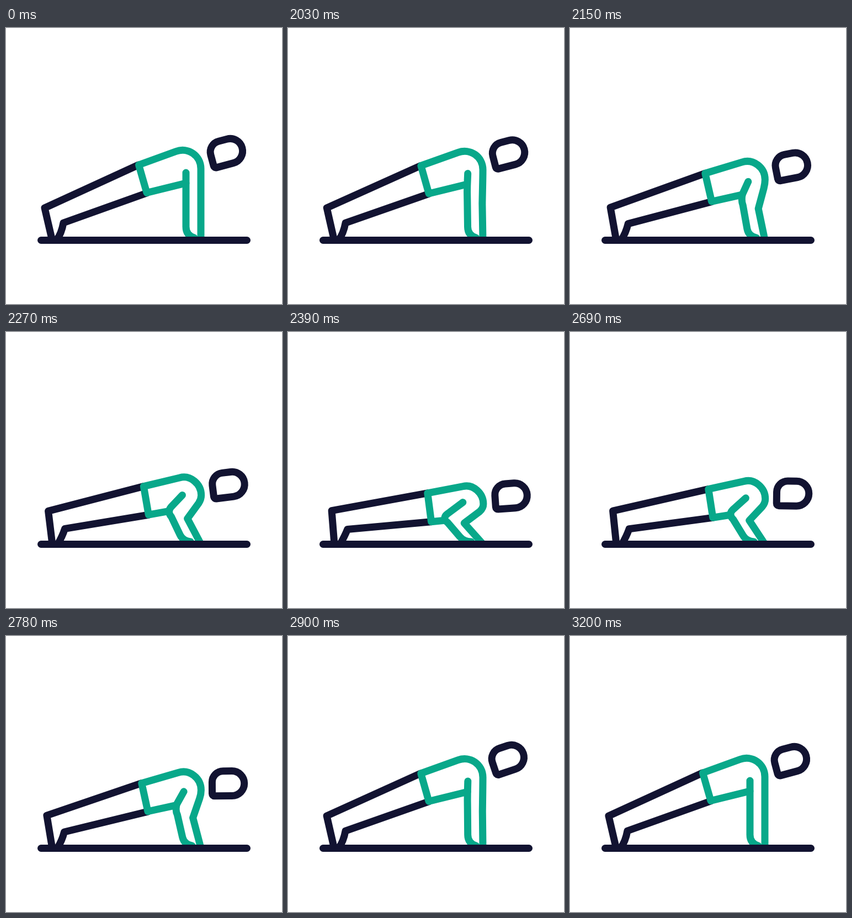
Write an HTML page that moves like this. It is 500 px wide and 500 px high and loops after 3.26 s.

```html
<!DOCTYPE html>
<html lang="en">
<head>
<meta charset="utf-8">
<title>Push-up</title>
<style>
  html, body { margin: 0; width: 100%; height: 100%; overflow: hidden; background: #fff; }
  svg { display: block; width: 100%; height: 100%; fill: none; stroke: #121331; stroke-width: 13; stroke-linecap: round; stroke-linejoin: round; }
  .shirt { stroke: #08a88a; }
</style>
</head>
<body>
<svg viewBox="0 0 500 500">
  <path id="legs"/>
  <path id="torso" class="shirt"/>
  <path id="arm" class="shirt"/>
  <path id="head" d="M-29.3 18.5V-2.5A20 20 0 0 1-9.3-22.5H6.5A22.5 22.5 0 0 1 6.5 22.5H-25.3A4 4 0 0 1-29.3 18.5Z"/>
  <path d="M63.5 384.5H436.5"/>
</svg>
<script>
const LOOP = 3260;

// Each part: path in the raised pose, path in the lowered pose
const poses = {
  legs: [
    'M240 248 L70 326 L83.5 384 M255 299 L104 353 C102 364 99 374 92 384',
    'M254 296 L80 323.5 L84 384 M260 348 L108 358 C105 365 101 373 95 384'
  ],
  torso: [
    'M326 281 L255 298.5 L240.5 248 L308 223.5 C330 215.5 353 231 353 255 C353 262 353 266 353 272 L353 317 L353 384',
    'M280 347 L260 348 L254 296 L318 285 C336 281 354 298 354 317 C354 323 351 327 347 330 L316 349 L353 384'
  ],
  arm: [
    'M326 262 L326 284 C326 290 326 301 326 308 L326 360 C326 370 331 377 341 380',
    'M316 313 L285 334 C278 339 278 344 286 349 L310 372 C315 377 321 380 331 380'
  ]
};

const el = id => document.getElementById(id);
const span = (t, from, to) => Math.min(1, Math.max(0, (t - from) / (to - from)));
const ease = x => x * x * (3 - 2 * x);
const mix = (a, b, k) => a + (b - a) * k;

function morph([up, down], k) {
  const target = down.match(/[\d.]+/g);
  let i = 0;
  return up.replace(/[\d.]+/g, n => mix(+n, +target[i++], k).toFixed(2));
}

// 0 = arms straight, 1 = chest near the floor
const lowering = t => ease(span(t, 2000, 2500) ** 0.815) - ease(span(t, 2580, 2930));

// The head lags behind the body, then overshoots and settles
function nod(t) {
  if (t < 2540) return 12 * lowering(t);
  if (t < 2745) return mix(12, 16.5, ease(span(t, 2540, 2745)));
  if (t < 2960) return mix(16.5, -8, ease(span(t, 2745, 2960)));
  return mix(-8, 0, ease(span(t, 2960, 3200)));
}

function draw(now) {
  const t = now % LOOP;
  const k = lowering(t);
  for (const id in poses) el(id).setAttribute('d', morph(poses[id], k));
  el('head').setAttribute('transform',
    `translate(${3 * k} ${65 * k}) rotate(${nod(t)} 334 240) translate(399.8 224.6) rotate(-15)`);
}

const start = performance.now();
function tick() {
  draw(performance.now() - start);
  requestAnimationFrame(tick);
}
tick();
</script>
</body>
</html>
```
